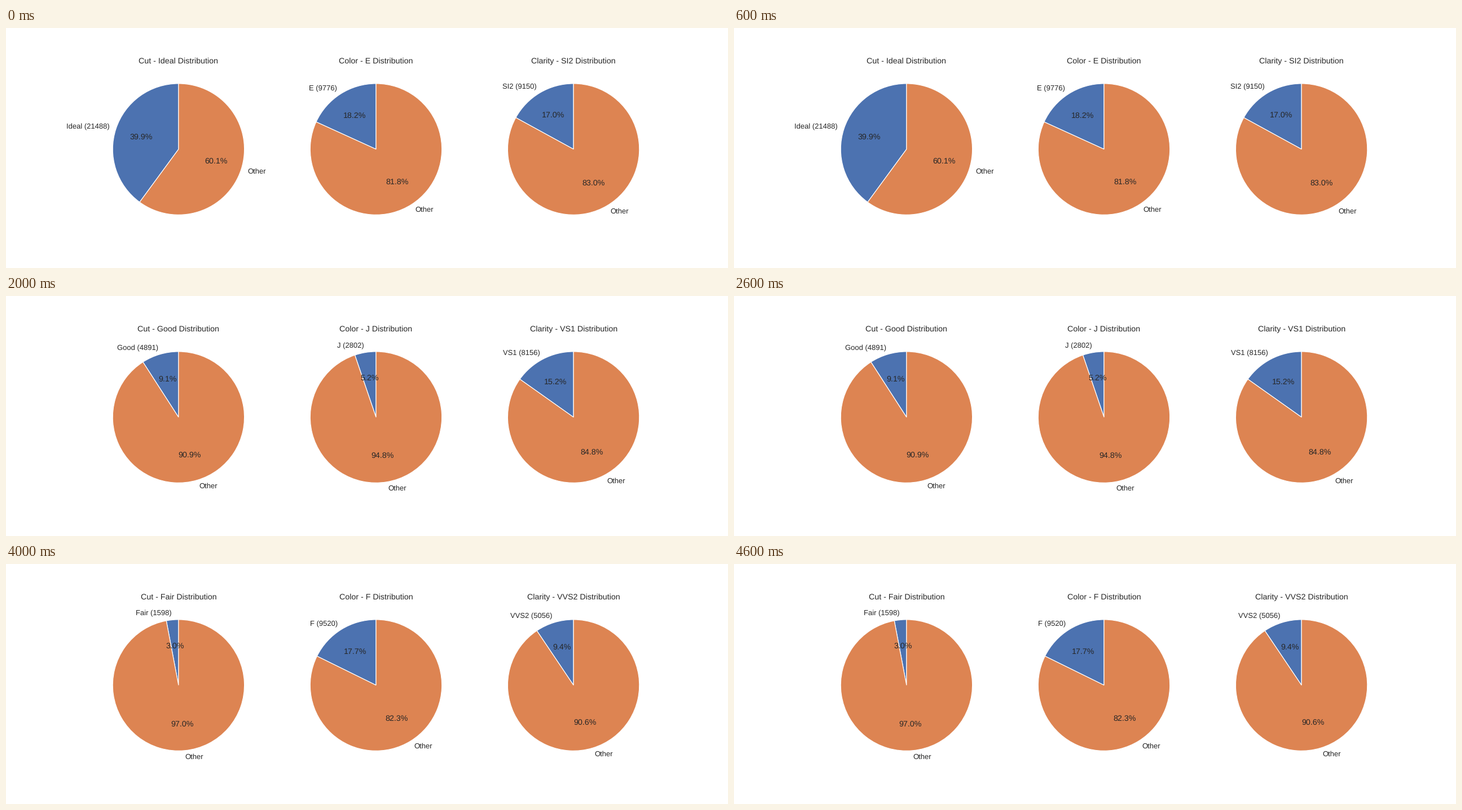
Write a matplotlib script that moves like this. It is 1280 px wide and 427 px high and loops after 5 s.

```python
import matplotlib.pyplot as plt
from matplotlib.animation import FuncAnimation

WIDTH, HEIGHT, DPI = 1280, 427, 128
PT = 2 / 3  # layout is designed for a 15 inch wide figure, drawn 10 inches wide
BLUE, ORANGE, INK = "#4C72B0", "#DD8452", "#262626"

plt.rcParams.update({
    "font.family": "Liberation Sans",
    "font.size": 12 * PT,
    "axes.titlesize": 12 * PT,
    "xtick.labelsize": 11 * PT,
    "text.color": INK,
    "text.hinting": "none",
})

TOTAL = 53794
COUNTS = {
    "Cut": [("Ideal", 21488), ("Premium", 13748), ("Good", 4891),
            ("Very Good", 12069), ("Fair", 1598)],
    "Color": [("E", 9776), ("I", 5407), ("J", 2802), ("H", 8272), ("F", 9520)],
    "Clarity": [("SI2", 9150), ("SI1", 13032), ("VS1", 8156),
                ("VS2", 12229), ("VVS2", 5056)],
}
STEPS = 5

fig, axes = plt.subplots(1, 3, figsize=(WIDTH / DPI, HEIGHT / DPI), dpi=DPI,
                         facecolor="white")
fig.subplots_adjust(left=0.125, right=0.9, bottom=0.11, top=0.88, wspace=0.2)


def draw_pie(ax, group, name, count):
    ax.clear()
    ax.pie([count, TOTAL - count], labels=[f"{name} ({count})", "Other"],
           colors=[BLUE, ORANGE], autopct="%1.1f%%", startangle=90,
           wedgeprops={"edgecolor": "white", "linewidth": PT})
    ax.set_title(f"{group} - {name} Distribution", pad=6 * PT)


def update(step):
    for ax, (group, rows) in zip(axes, COUNTS.items()):
        draw_pie(ax, group, *rows[step])
    return []


anim = FuncAnimation(fig, update, frames=STEPS, interval=1000,
                     repeat=True, repeat_delay=0)
plt.show()
```
